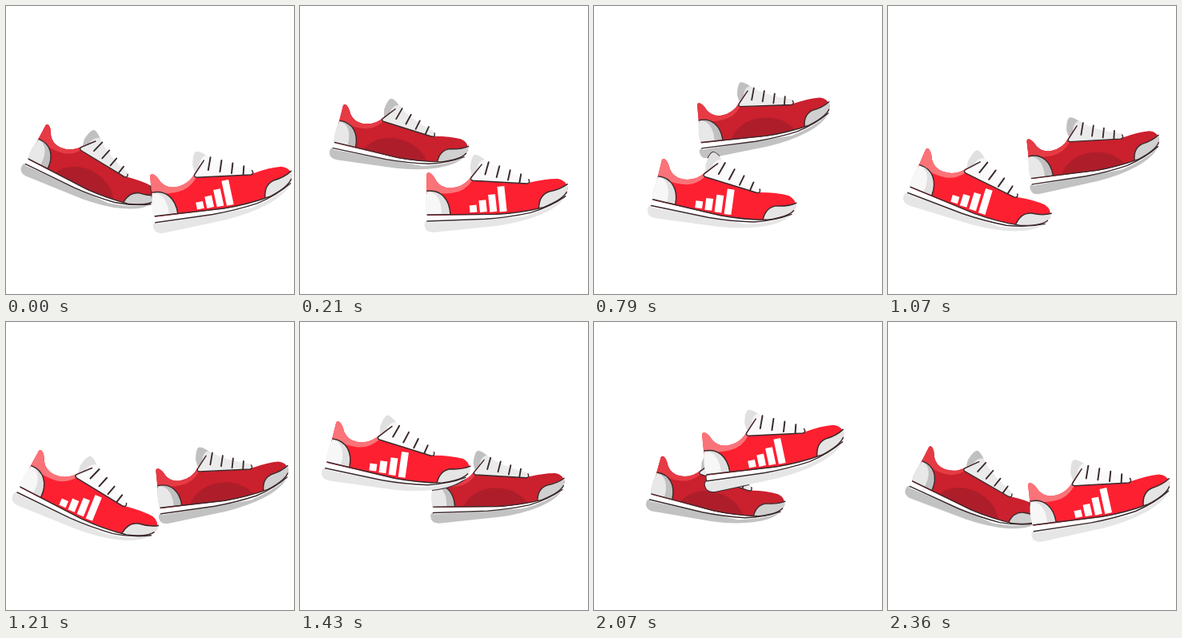
An HTML page with a canvas for the animation above (2.43 s loop, 360 by 360 pixels).

```html
<!DOCTYPE html>
<html lang="en">
<head>
<meta charset="utf-8">
<title>Walking shoes</title>
<style>
html, body { margin: 0; width: 100%; height: 100%; overflow: hidden; background: #fff; }
canvas { display: block; width: 100vw; height: 100vh; object-fit: contain; }
</style>
</head>
<body>
<canvas id="stage" width="360" height="360"></canvas>
<script>
const LOOP = 2430, STEPS = 34, INK = '#3a2a2c';
const ctx = document.getElementById('stage').getContext('2d');

// one stride: step, x and y of the heel tab, angle in degrees
const STRIDE = [
  [0, 182, 210, -12], [6, 135, 203, 0], [12, 78, 188, 9.5], [15, 50, 178, 17],
  [17, 44, 160, 22], [20, 48, 124, 8], [24, 72, 90, -5], [26, 93, 93, -9],
  [29, 137, 138, -12], [33, 177, 201, -12.5]
];

const path = d => new Path2D(d);
const SHAPE = {
  body: path('M130 228L132.5 205Q134 202 137 204Q141 207 144 215Q150 225 162 225.5Q178 226 189 213L201 201L260 229Q283 226 297 228Q307 231 308 241Q305 253 275 262Q245 266 215 265L128 257Z'),
  collar: path('M130 228L132.5 205Q134 202 137 204Q141 207 144 215Q150 225 162 225.5Q178 226 189 213L201 201L203 206L189 219Q178 232 162 232Q148 232 142 229Z'),
  counter: path('M131 226C149 226 158 240 157 258L127 256Q126 240 131 226Z'),
  counterLight: path('M131 227C143 228 148 241 146 257L127 256Q126 240 131 227Z'),
  counterEdge: path('M131 226C149 226 158 240 157 258'),
  tongue: path('M188 203Q191 189 195 187Q199 186 212 198L209 206L190 213Z'),
  tongueShade: path('M188 203Q191 189 195 187Q199 186 207 194Q199 195 196 206L189 212Z'),
  panel: path('M188 215L201 201Q204 197 211 198Q230 213 259 223Q264 230 257 230L190 219Q186 218 188 215Z'),
  panelEdge: path('M203 200L188 215Q186 218 190 219L257 230Q262 230 260 225'),
  cap: path('M308 236Q298 242 284 243Q271 246 269 262L275 262Q305 253 308 241Z'),
  capEdge: path('M308 236Q298 242 284 243Q271 246 269 262'),
  midsole: path('M128 256L215 264.5Q245 266 275 262Q305 253 308 240Q310 246 303 253Q282 265 250 271L128 266Q125 261 128 256Z'),
  midEdge: path('M128 256L215 264.5Q245 266 275 262Q300 255 306 246'),
  outsole: path('M127 264L200 269Q230 270 258 267Q284 262 304 251Q296 263 270 271Q246 278 215 279L136 279Q123 279 123 269Q123 264 127 264Z'),
  outEdge: path('M127 264L200 269Q230 270 258 267Q284 262 304 251'),
  belly: path('M168 260Q182 239 210 239Q242 241 255 264Q230 266 215 265Z'),
  laces: new Path2D(),
  bars: new Path2D()
};

for (let i = 0; i < 4; i++) {
  const lx = 212 + 13 * i, ly = 198 + 6.5 * i;
  SHAPE.laces.moveTo(lx, ly);
  SHAPE.laces.lineTo(lx - 6 + i, ly + 15 - 1.5 * i);
  const x = 182 + 12.5 * i, foot = 259 + i, top = 250 - 5 * i - i * (i - 1) / 2 - (i > 2 ? 2 : 0);
  SHAPE.bars.rect(x, top, 9, foot - top);
}

const NEAR = { size: 0.99, at: (x, y) => [x, y], body: '#fd2031', collar: '#fa7378',
  light: '#f7f7f7', shade: '#e0e0e0', panel: '#fafafa', cap: '#e5e5e5', sole: '#e6e6e6', bars: true };
// the far shoe is smaller, lifts less and walks half a loop later
const FAR = { size: 0.925, at: (x, y) => [0.99 * x + 9, 0.7 * y + 36], body: '#cb202d', collar: '#e63a44',
  light: '#e8e8e8', shade: '#c0c0c0', panel: '#ebebeb', cap: '#d0d0d0', sole: '#c2c2c2', belly: '#ad1e2a' };

// smooth curve through the stride, wrapping at the end of the loop
function pose(step) {
  const n = STRIDE.length;
  const key = i => {
    const [s, ...rest] = STRIDE[(i + n) % n];
    return [s + STEPS * Math.floor(i / n), ...rest];
  };
  let i = n - 1;
  while (STRIDE[i][0] > step) i--;
  const [a, b, c, d] = [key(i - 1), key(i), key(i + 1), key(i + 2)];
  const span = c[0] - b[0], u = (step - b[0]) / span;
  return [1, 2, 3].map(j => {
    const m0 = (c[j] - a[j]) / (c[0] - a[0]) * span;
    const m1 = (d[j] - b[j]) / (d[0] - b[0]) * span;
    const rise = c[j] - b[j];
    return b[j] + u * (m0 + u * (3 * rise - 2 * m0 - m1 + u * (m0 + m1 - 2 * rise)));
  });
}

function fill(name, color) {
  ctx.fillStyle = color;
  ctx.fill(SHAPE[name]);
}

function line(name, width) {
  ctx.strokeStyle = INK;
  ctx.lineWidth = width;
  ctx.stroke(SHAPE[name]);
}

function shoe(step, look) {
  const [x, y, angle] = pose(step);
  ctx.save();
  ctx.translate(...look.at(x, y));
  ctx.rotate(angle * Math.PI / 180);
  ctx.scale(look.size, look.size);
  ctx.translate(-135, -203);
  ctx.lineCap = ctx.lineJoin = 'round';

  // the outer outline shows only where it crosses the other shoe
  ctx.globalCompositeOperation = 'source-atop';
  ['body', 'tongue', 'midsole', 'outsole'].forEach(s => line(s, 2.2));
  ctx.globalCompositeOperation = 'source-over';

  fill('outsole', look.sole);
  fill('midsole', '#fff');
  fill('tongue', look.light);
  fill('tongueShade', look.shade);
  fill('body', look.body);
  if (look.belly) fill('belly', look.belly);
  fill('collar', look.collar);
  fill('counter', look.shade);
  fill('counterLight', look.light);
  fill('cap', look.cap);
  fill('panel', look.panel);
  if (look.bars) fill('bars', '#fff');
  ['counterEdge', 'capEdge', 'panelEdge', 'midEdge', 'outEdge'].forEach(s => line(s, 1.5));
  line('laces', 2);
  ctx.restore();
}

function draw(ms) {
  const step = Math.floor((ms % LOOP) / LOOP * STEPS + 0.1) % STEPS;
  ctx.clearRect(0, 0, 360, 360);
  shoe((step + STEPS / 2) % STEPS, FAR);
  shoe(step, NEAR);
}

const start = performance.now();
function tick() {
  draw(performance.now() - start);
  requestAnimationFrame(tick);
}
tick();
</script>
</body>
</html>
```
